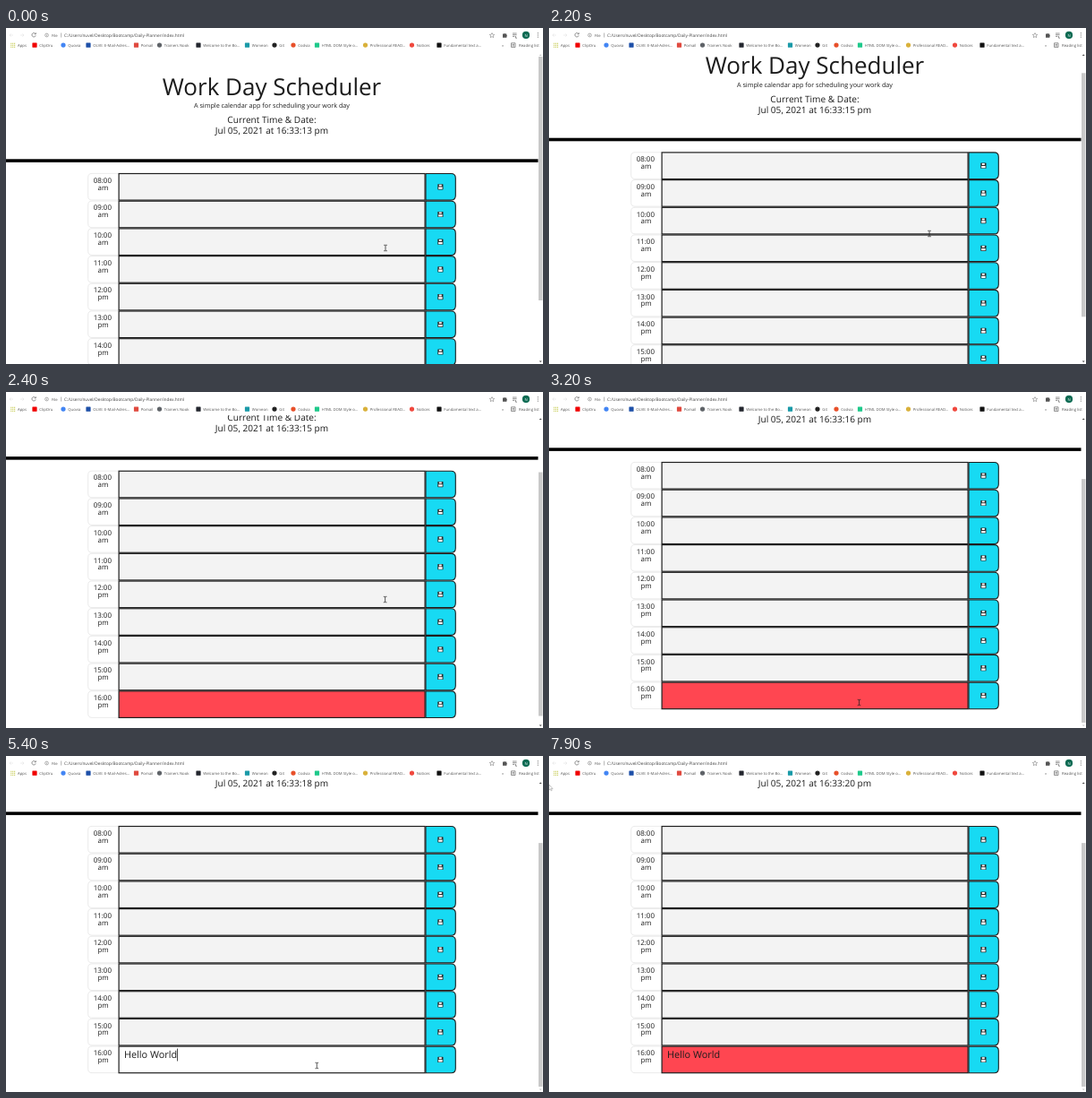
Write an HTML page that moves like this. It is 600x375 px and loops after 8 s.

```html
<!DOCTYPE html>
<html lang="en">
<head>
<meta charset="utf-8">
<title>Work Day Scheduler</title>
<style>
  html, body { margin: 0; width: 100%; height: 100%; overflow: hidden; background: #fff; }
  svg { display: block; width: 600px; height: 375px; }
  text { font-family: "Open Sans", sans-serif; fill: #1c1c1c; text-rendering: geometricPrecision; white-space: pre; }
  .mid { text-anchor: middle; }
  .bar text { font-size: 4.25px; fill: #555; }
  .line { fill: none; stroke: #666; stroke-width: .7; }
  .cell { fill: #f3f3f3; stroke: #1e1e1e; stroke-width: 1.2; }
  .save { fill: #17daf3; stroke: #1e1e1e; stroke-width: 1.1; }
  .save.hover { fill: #3f50f7; stroke: #b5b5c8; stroke-dasharray: 1 .6; }
</style>
</head>
<body>
<svg viewBox="0 0 600 375">
  <defs>
    <clipPath id="view"><rect y="26" width="600" height="349"/></clipPath>
    <g id="disk">
      <rect x="-3.1" y="-3.1" width="6.2" height="6.2" rx=".6" fill="#2b2b2b"/>
      <path d="M-1.6-2.6h3v1.9h-3zM-2.2.2h4.4v2.3h-4.4z" fill="#fff"/>
    </g>
  </defs>
  <g clip-path="url(#view)">
    <g id="page">
      <text class="mid" x="297" y="75" font-size="26">Work Day Scheduler</text>
      <text class="mid" x="297" y="89.4" font-size="7.22">A simple calendar app for scheduling your work day</text>
      <text class="mid" x="297" y="106.3" font-size="10.1">Current Time &amp; Date:</text>
      <text class="mid" x="297" y="118.3" font-size="10.1" id="clock"></text>
      <rect y="146.3" width="594.5" height="3.6"/>
      <g id="rows"></g>
      <text id="note" x="132" y="421.3" font-size="10.83"></text>
      <rect id="caret" y="410.5" width=".7" height="14"/>
    </g>
    <path id="up" d="M595.7 31l1.5-1.7 1.5 1.7z" fill="#505050"/>
    <path id="down" d="M595.7 371.5l1.5 1.7 1.5-1.7z" fill="#505050"/>
    <rect id="thumb" x="595" width="4.5" height="272" fill="#c9c9c9"/>
  </g>
  <g class="bar" id="bar">
    <path class="line" style="stroke:#e6e6e6" d="M8 8H4m1.6-1.6L4 8l1.6 1.6M16 8h4m-1.6-1.6L20 8l-1.6 1.6"/>
    <path class="line" d="M33 6.6A2.2 2.2 0 1 0 33.2 8.4M33.3 5.2v1.6h-1.6"/>
    <circle class="line" cx="45.5" cy="8" r="1.9" style="stroke-width:.5"/>
    <path class="line" style="stroke-width:.5" d="M45.5 7.7v1.3M45.5 6.8v.4M61.7 5.5v5"/>
    <text x="51" y="9.6">File</text>
    <text x="65" y="9.7" style="font-size:4.77px;fill:#444">C:/Users/nuvel/Desktop/Bootcamp/Daily-Planner/index.html</text>
    <path class="line" d="M543 5.5l.8 1.7 1.9.2-1.4 1.3.4 1.9-1.7-1-1.7 1 .4-1.9-1.4-1.3 1.9-.2z" style="stroke-width:.5"/>
    <path d="M555 6.5h1.4a.9.9 0 0 1 1.7 0h1.3v1.4a.9.9 0 0 1 0 1.6v1.2H555z" fill="#555"/>
    <path class="line" d="M566 6h4.6M566 7.7h4.6M566 9.4h2.4M569.5 9v2.2h1.5"/>
    <circle cx="581" cy="7.9" r="4.1" fill="#0b6a52"/>
    <text class="mid" x="581" y="9.5" style="fill:#fff">N</text>
    <path d="M594.3 5.7v.1M594.3 7.9v.1M594.3 10.1v.1" stroke="#555" stroke-linecap="round"/>
    <path d="M5.2 17.2h5M5.2 19.2h5M5.2 21.2h5" stroke="#c3c94a" stroke-width="1.1" stroke-dasharray="1.2 .7"/>
    <text x="13" y="20.7">Apps</text>
    <text x="554" y="20.7">»</text>
    <path class="line" d="M564.5 16.8h4.5v4.6h-4.5zM565.5 18.4h2.5M565.5 19.9h2.5"/>
    <text x="573" y="20.7">Reading list</text>
  </g>
  <path id="beam" d="M-1.8-3.2h1.3l.5.4.5-.4h1.3M0-2.8v5.6M-1.8 3.2h1.3l.5-.4.5.4h1.3" fill="none" stroke="#222" stroke-width=".75"/>
  <path id="hand" d="M-1.2-3.6q.8-.7 1.4.1v2.4l2.6.6q.8.3.7 1.2L3 3.6h-4L-3.2.6q0-.9.9-.7l1.1.8z" fill="#fff" stroke="#222" stroke-width=".6"/>
  <path id="arrow" d="M-1-3.5v6l1.4-1.2 1 2 .9-.4-.9-1.9h1.8z" fill="#fff" stroke="#888" stroke-width=".5"/>
</svg>
<script>
const $ = id => document.getElementById(id);
const LOOP = 8000, PITCH = 30.7, TOP = 161.9, SCROLL = 84;

// [icon x, colour, shape, label]
const bookmarks = [
  [32, '#f00000', 'square', 'ClipOru'],
  [64, '#4285f4', 'circle', 'Quovia'],
  [92, '#1d4fa8', 'square', 'OLVE: E-Mail-Adres…'],
  [145.5, '#e04a3f', 'square', 'Pomail'],
  [171.5, '#5f6368', 'circle', 'Trainers Nook'],
  [215, '#23262e', 'square', 'Welcome to the Bo…'],
  [269.5, '#1a9aa8', 'square', 'Worveon'],
  [300, '#222222', 'circle', 'Git'],
  [321, '#e8502a', 'circle', 'Codvia'],
  [347.5, '#1fc98b', 'square', 'HTML DOM Style o…'],
  [401.5, '#d9b13b', 'circle', 'Professional READ…'],
  [453.5, '#f0483e', 'circle', 'Notices'],
  [484, '#111111', 'square', 'Fundamental text a…']
];
$('bar').innerHTML += bookmarks.map(([x, colour, shape, label]) =>
  `<rect x="${x - 2.6}" y="16.5" width="5.2" height="5.2" rx="${shape === 'circle' ? 2.6 : .4}" fill="${colour}"/>
   <text x="${x + 5.3}" y="20.7">${label}</text>`).join('');

$('rows').innerHTML = Array.from({ length: 9 }, (_, i) => {
  const hour = i + 8;
  return `<g transform="translate(0 ${TOP + i * PITCH})">
    <path d="M126 .5H96q-4.3 0-4.3 4.3v21q0 4.3 4.3 4.3h30" fill="none" stroke="#dcdcdc" stroke-width=".6"/>
    <text class="mid" x="107.8" y="10.8" font-size="7.94">${String(hour).padStart(2, '0')}:00</text>
    <text class="mid" x="108.5" y="18.7" font-size="7.94">${hour < 12 ? 'am' : 'pm'}</text>
    <rect class="cell" x="126.1" y=".6" width="342" height="29.6"/>
    <path class="save" d="M469 .6h28.3q5 0 5 5v19.6q0 5-5 5H469z"/>
    <use href="#disk" x="485.4" y="15.4"/>
  </g>`;
}).join('');

const last = name => [...document.querySelectorAll(name)].pop();
const activeCell = last('.cell'), activeSave = last('.save');

const message = 'Hello World';
const keyTimes = [4000, 4200, 4400, 4500, 4700, 4800, 5000, 5100, 5200, 5300, 5400];
const FOCUS = 3400, CLICK = 6500, LEAVE = 7400;

// [time, x, y] of the pointer
const path = [
  [0, 424, 245.5], [750, 424, 245.5], [1400, 425, 229.5], [2350, 425, 229.5], [3000, 346.5, 346.5],
  [3200, 346.5, 346.5], [3400, 347.3, 345.5], [5700, 347.3, 345.5], [6400, 491, 346.5],
  [6600, 492, 346.5], [7350, 492, 346.5], [7700, 5, 40], [7900, 1, 35.5], [LOOP, 1, 35.5]
];
const clamp = v => Math.max(0, Math.min(1, v));
const smooth = p => p * p * (3 - 2 * p);

function pointerAt(t) {
  const i = path.findIndex(p => p[0] > t);
  const [t0, x0, y0] = path[i - 1], [t1, x1, y1] = path[i];
  const p = smooth((t - t0) / (t1 - t0));
  return [x0 + (x1 - x0) * p, y0 + (y1 - y0) * p];
}

const show = (id, on) => $(id).setAttribute('visibility', on ? 'visible' : 'hidden');
const place = (id, x, y) => $(id).setAttribute('transform', `translate(${x} ${y})`);

function draw(t) {
  const scroll = SCROLL * (1 - (1 - clamp((t - 2150) / 490)) ** 3);
  place('page', 0, -scroll);
  $('thumb').setAttribute('y', 32 + scroll * .775);
  $('up').setAttribute('opacity', scroll > 0 ? 1 : .3);
  $('down').setAttribute('opacity', scroll < SCROLL ? 1 : .3);
  $('clock').textContent = `Jul 05, 2021 at 16:33:${13 + Math.floor((t + 40) / 1010)} pm`;

  const typed = keyTimes.filter(k => k <= t);
  const note = $('note'), focused = t >= FOCUS && t < CLICK;
  note.textContent = message.slice(0, typed.length);
  const lastKey = typed.length ? typed[typed.length - 1] : FOCUS;
  show('caret', focused && (t - lastKey) % 1000 < 500);
  $('caret').setAttribute('x', 132 + note.getComputedTextLength());
  activeCell.style.fill = focused ? '#fff' : '#ff4651';

  const [x, y] = pointerAt(t);
  const onSave = x > 469 && y > 323;
  activeSave.classList.toggle('hover', onSave);
  const leaving = t >= LEAVE && !onSave;
  for (const [id, on] of [['beam', !onSave && !leaving], ['hand', onSave], ['arrow', leaving]]) {
    show(id, on);
    place(id, x, y);
  }
}

function frame() {
  draw(performance.now() % LOOP);
  requestAnimationFrame(frame);
}
frame();
</script>
</body>
</html>
```
